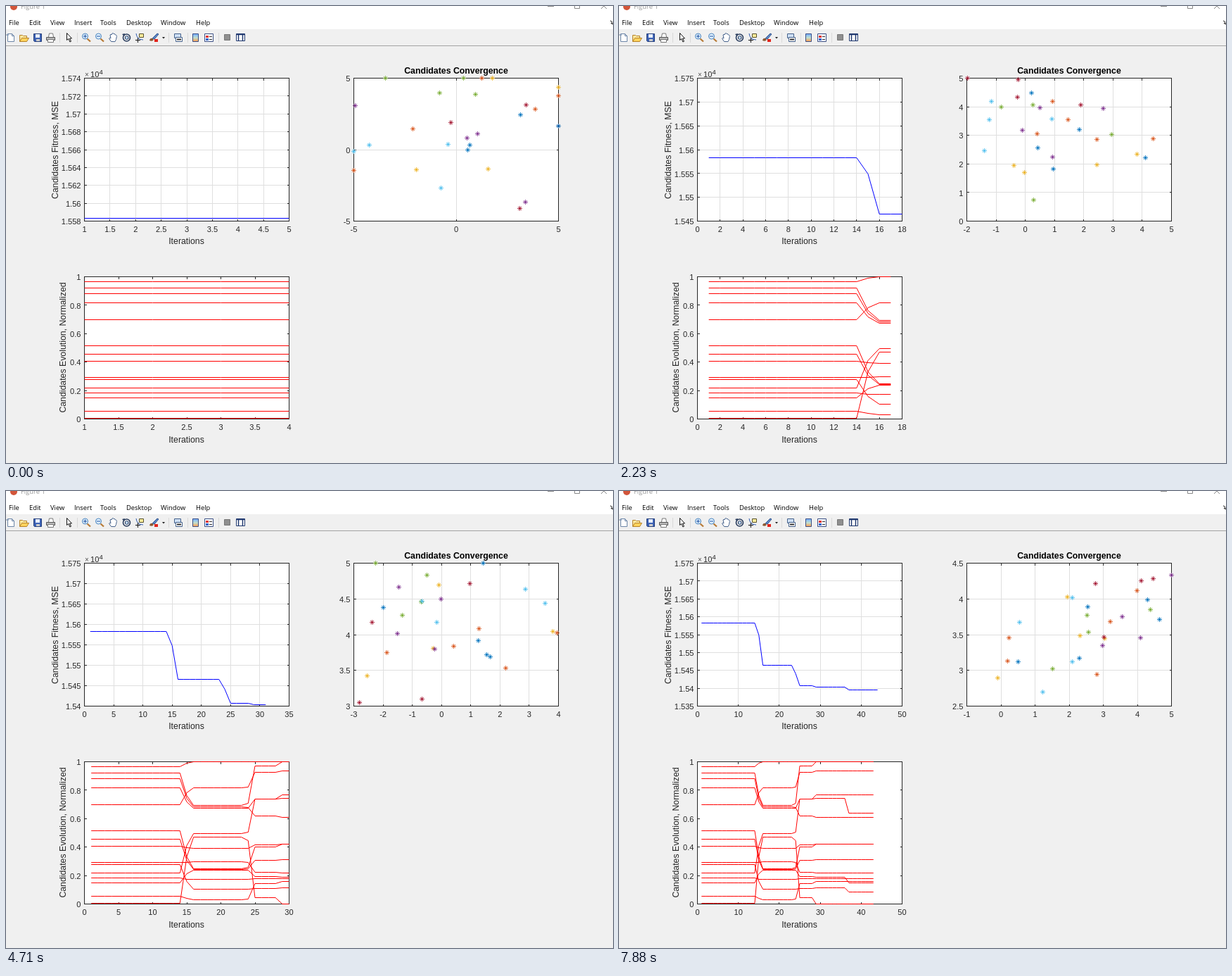
These frames come from a looping animation (863 px wide and 649 px high, 8000 ms). An HTML page:

```html
<!DOCTYPE html>
<html lang="en">
<head>
<meta charset="utf-8">
<title>Convergence plots</title>
<style>
  html, body { margin: 0; width: 100%; height: 100%; overflow: hidden; background: #f0f0f0; }
  svg { display: block; width: 863px; height: 649px; }
  text { font-family: "Liberation Sans", Arial, sans-serif; fill: #262626; }
  .menu text { font: 9.4px "Open Sans", "Noto Sans", sans-serif; fill: #000; }
  .tick { font-size: 11.1px; }
  .label { font-size: 12.3px; text-anchor: middle; }
  .title { font-size: 12.3px; font-weight: bold; text-anchor: middle; fill: #000; }
  .mid { text-anchor: middle; }
  .end { text-anchor: end; }
  .grid { stroke: #dfdfdf; }
  .axis { stroke: #262626; fill: none; }
  .grid, .axis { shape-rendering: crispEdges; }
  .line { fill: none; stroke-linejoin: round; }
  .star { fill: none; stroke-width: .85; }
</style>
</head>
<body>
<svg viewBox="0 0 863 649">
  <rect width="863" height="649" fill="#f0f0f0"/>
  <rect width="863" height="33" fill="#fff"/>
  <path d="M0 56.5H863" stroke="#a2a2a2"/>

  <g class="menu">
    <circle cx="11" cy="1" r="5" fill="#d2553a"/>
    <text x="21" y="4" style="fill:#999">Figure 1</text>
    <text x="4" y="27">File</text>
    <text x="33" y="27">Edit</text>
    <text x="63" y="27">View</text>
    <text x="97" y="27">Insert</text>
    <text x="134" y="27">Tools</text>
    <text x="171" y="27">Desktop</text>
    <text x="220" y="27">Window</text>
    <text x="270" y="27">Help</text>
  </g>
  <g fill="none" stroke="#888">
    <path d="M770 .5h9M808.5 0v3.5h7V0M846 4l4-4 4 4"/>
    <path d="M859 21q3 0 3 4m-2-1l2 2 2-2" stroke="#222"/>
  </g>

  <g fill="none">
    <path d="M76.5 38v14M101.5 38v14M231.5 38v14M258.5 38v14M302.5 38v14" stroke="#d9d9d9"/>
    <path d="M2.5 39.5h6l3 3v8h-9z" fill="#fff" stroke="#6d86a8"/>
    <path d="M8.5 39.5v3h3M0 41h4" stroke="#6d86a8"/>
    <path d="M19.5 50.5v-9h4l1 1h5v3" fill="#ffe9a0" stroke="#b5822a"/>
    <path d="M19.5 50.5l3-5h10l-3 5z" fill="#ffd35c" stroke="#b5822a"/>
    <path d="M39.5 39.5h11v11h-10l-1-1z" fill="#3d62b5" stroke="#27407c"/>
    <path d="M42 40h6v5h-6z" fill="#e8f0ff"/>
    <path d="M43 47h5v3h-5z" fill="#ccc"/>
    <path d="M60.5 44l1-5h5l1 5" fill="#fff" stroke="#777"/>
    <path d="M57.5 44.5h12v4h-12z" fill="#b9b9b9" stroke="#555"/>
    <path d="M59.5 47.5h8v4h-8z" fill="#fff" stroke="#777"/>
    <path d="M86.5 38.5v10l2.4-2 2 4.5 1.6-.8-2-4.2h3z" fill="#fff" stroke="#111"/>
    <g id="zoom">
      <path d="M115.5 46.5l4.5 4" stroke="#b77a35" stroke-width="2.2"/>
      <circle cx="112.5" cy="43" r="4" fill="#dff1ff" stroke="#4a83bd"/>
      <path d="M110 43h5" stroke="#1f4fa0"/>
    </g>
    <use href="#zoom" x="19"/>
    <path d="M112.5 40.5v5" stroke="#1f4fa0"/>
    <path d="M149.5 50.5l-3-4.5q1-1.500 2.5 0l-1-5q1-1.500 2 0l1-2q1.200-.8 1.800 0l1.200.8q1.200-.4 1.500 1l1.500.8q.8.5.3 2l-.8 4-1.500 3z" fill="#fff" stroke="#46628c"/>
    <circle cx="171.5" cy="45" r="5" stroke="#283b5c" stroke-width="1.6"/>
    <path d="M169.5 43.5l2-1 2.5 1v3l-2.5 1-2-1z" fill="#b9d3f0" stroke="#283b5c"/>
    <path d="M165 40l4-1-1 4z" fill="#283b5c"/>
    <path d="M185 39q1 9 10 9" stroke="#2d5bb0"/>
    <path d="M189.5 39.5h6v5h-6z" fill="#ffeb9a" stroke="#57532f"/>
    <path d="M184 48.5h7M187.5 45v7" stroke="#111"/>
    <path d="M208 46l7-7 2 1-6 7z" fill="#5b87c9" stroke="#35568c"/>
    <path d="M204 49q1-4 4-3l2 2q-2 3-6 1z" fill="#8a5a34"/>
    <path d="M211 47h5v4h-5z" fill="#e3241b"/>
    <path d="M222 44h4l-2 2.5z" fill="#222"/>
    <path d="M239.5 39.5h9v6h-9z" fill="#cfe0f5" stroke="#44608a"/>
    <path d="M241.5 44.5h9v6h-9z" fill="#fff" stroke="#44608a"/>
    <path d="M243 47.5h6" stroke="#333" stroke-width="2"/>
    <path d="M265.5 39.5h8v11h-8z" fill="url(#bar)" stroke="#3b4f85"/>
    <path d="M282.5 39.5h12v11h-12z" fill="#fff" stroke="#3b4f85"/>
    <path d="M284 42h4v3h-4z" fill="#d33"/>
    <path d="M284 46h4v3h-4z" fill="#36c"/>
    <path d="M289 43.5h4M289 47.5h4" stroke="#333"/>
    <path d="M310.5 40.5h8v8h-8z" fill="#8f8f8f" stroke="#777"/>
    <path d="M327.5 39.5h12v10h-12z" fill="#fff" stroke="#223a70"/>
    <path d="M327 40.5h13M330.5 40v9M336.5 40v9" stroke="#223a70" stroke-width="1.5"/>
  </g>
  <defs>
    <linearGradient id="bar" x2="0" y2="1">
      <stop stop-color="#6fa8ff"/><stop offset=".5" stop-color="#bfe0d0"/><stop offset="1" stop-color="#ff9a4a"/>
    </linearGradient>
  </defs>

  <g id="plots"></g>

  <text x="112" y="101" font-size="10" fill-opacity=".75">×</text>
  <text class="tick" x="120" y="101">10</text>
  <text x="132.5" y="97" font-size="9.5">4</text>
  <text class="title" x="640" y="96">Candidates Convergence</text>
  <text class="label" x="256.5" y="338">Iterations</text>
  <text class="label" x="256.5" y="619.5">Iterations</text>
  <text class="label" transform="translate(73.5 204.5) rotate(-90)">Candidates Fitness, MSE</text>
  <text class="label" transform="translate(85 485) rotate(-90)">Candidates Evolution, Normalized</text>
</svg>

<script>
const LOOP = 8000, COUNT = 30;
const fitBox = { l: 111.5, r: 402.5, t: 102.5, b: 305.5 };
const starBox = { l: 494.5, r: 785.5, t: 102.5, b: 305.5 };
const evoBox = { l: 111.5, r: 402.5, t: 384.5, b: 586.5 };
const colors = ['#0072bd', '#d95319', '#edb120', '#7e2f8e', '#77ac30', '#4dbeee', '#a2142f'];

// iteration n is reached at time t; x and y give the reach of the swarm
const keys = [
  { n: 5, t: 0, x: [-6, 7], y: [-4.1, 7] },
  { n: 9, t: 600, x: [-3.4, 5.6], y: [-.55, 6] },
  { n: 15, t: 1530, x: [-1.5, 4.4], y: [-.05, 5.3] },
  { n: 23, t: 3010, x: [-2.75, 4.3], y: [2.05, 5.4] },
  { n: 31, t: 4710, x: [-2.8, 3.95], y: [3.05, 5.2] },
  { n: 37, t: 6110, x: [-1.4, 3.1], y: [2.99, 4.6] },
  { n: 44, t: 7880, x: [-.1, 5], y: [2.7, 4.33] }
];

// levels of each trait: at the start, from 16, from 29 and, if it moves again, from 37
const traits = [
  [.966, 1, 1], [.92, .692, 1], [.881, .684, .61], [.818, .672, .745, .639],
  [.699, .818, .938], [.517, .25, .42], [.456, .245, .314], [.404, .391, .419],
  [.29, .296, .217], [.276, .105, .112, .083], [.22, .493, .765],
  [.181, .172, .178], [.15, .24, .188, .147], [.054, .03, .158], [.006, .47, 0]
];

const mix = (a, b, u) => a + (b - a) * u;

function trait([a, b, c, d = c], i) {
  if (i < 15) return a;
  if (i < 16) return mix(a, b, .7);
  if (i < 24) return b;
  if (i < 25) return mix(b, c, .05);
  if (i < 29) return mix(b, c, .9);
  return i < 37 ? c : d;
}

// each improvement lowers the best error
const drops = [[15, .00345], [16, .0084], [24, .0024], [25, .0034], [29, .0004], [37, .0007]];
const fitness = i => drops.reduce((v, [at, d]) => i >= at ? v - d : v, 1.55835);

// pair of keys around a value, and the way between them
function between(field, v) {
  const j = Math.min(keys.length - 2, keys.filter(k => k[field] <= v).length - 1);
  const a = keys[j], b = keys[j + 1];
  return { a, b, u: Math.min(1, (v - a[field]) / (b[field] - a[field])) };
}

function iterationAt(t) {
  const { a, b, u } = between('t', t);
  return Math.floor(mix(a.n, b.n, u) + 1e-6);
}

function random(seed) {
  const v = Math.sin(seed * 127.1) * 43758.5453;
  return v - Math.floor(v);
}

// bell-shaped scatter stretched over the current reach, held inside the search space
function spread(n, dim) {
  const { a, b, u } = between('n', n);
  const lo = mix(a[dim][0], b[dim][0], u), hi = mix(a[dim][1], b[dim][1], u);
  const seed = n * 201 + (dim === 'y' ? 100 : 0);
  const raw = Array.from({ length: COUNT }, (_, k) =>
    random(seed + k) + random(seed + k + .3) + random(seed + k + .6));
  const min = Math.min(...raw), max = Math.max(...raw);
  return raw.map(v => Math.max(-5, Math.min(5, mix(lo, hi, (v - min) / (max - min)))));
}

function countAxis(n) {
  const step = n < 7 ? .5 : n < 12 ? 1 : n === 15 ? 5 : n <= 20 ? 2 : n <= 40 ? 5 : 10;
  return { lo: n < 12 ? 1 : 0, hi: Math.ceil(n / step) * step, step };
}

function dataAxis(values) {
  const min = Math.min(...values), max = Math.max(...values), span = max - min;
  const step = span > 8.8 ? 5 : span > 7.5 ? 2 : span > 3.3 ? 1 : .5;
  return { lo: Math.floor(min / step) * step, hi: Math.ceil(max / step) * step, step };
}

function fitAxis(n) {
  if (n < 15) return { lo: 1.558, hi: 1.574, step: .002 };
  return { lo: Math.floor(fitness(n) / .005) * .005, hi: 1.575, step: .005 };
}

const scales = (box, ax, ay) => ({
  x: v => mix(box.l, box.r, (v - ax.lo) / (ax.hi - ax.lo)),
  y: v => mix(box.b, box.t, (v - ay.lo) / (ay.hi - ay.lo))
});

const snap = v => Math.floor(v + .01) + .5;

function ticks({ lo, hi, step }) {
  const count = Math.round((hi - lo) / step);
  return Array.from({ length: count + 1 }, (_, i) => +(lo + i * step).toFixed(4));
}

function frame(box, ax, ay, s, grid) {
  const { l, r, t, b } = box;
  let lines = '', marks = '', text = '';
  for (const v of ticks(ax)) {
    const x = snap(s.x(v));
    lines += `M${x} ${t}V${b}`;
    marks += `M${x} ${b}v-3M${x} ${t}v3`;
    text += `<text class="tick mid" x="${s.x(v)}" y="${b + 15.7}">${v}</text>`;
  }
  for (const v of ticks(ay)) {
    const y = snap(s.y(v));
    lines += `M${l} ${y}H${r}`;
    marks += `M${l} ${y}h3M${r} ${y}h-3`;
    text += `<text class="tick end" x="${l - 5}" y="${s.y(v) + 4.7}">${v}</text>`;
  }
  return `<rect x="${l}" y="${t}" width="${r - l}" height="${b - t}" fill="#fff"/>` +
    (grid ? `<path class="grid" d="${lines}"/>` : '') +
    `<path class="axis" d="M${l} ${t}H${r}V${b}H${l}Z${marks}"/>` + text;
}

function curve(level, n, s, color) {
  let pts = '';
  for (let i = 1; i <= n; i++) pts += `${s.x(i).toFixed(2)},${snap(s.y(level(i)))} `;
  return `<polyline class="line" stroke="${color}" points="${pts}"/>`;
}

function star(x, y, color) {
  return `<path class="star" stroke="${color}" d="M${x - 3.5} ${y}h7M${x} ${y - 3.5}v7` +
    `M${x - 2.5} ${y - 2.5}l5 5M${x - 2.5} ${y + 2.5}l5-5"/>`;
}

function draw(n) {
  const fx = countAxis(n), fy = fitAxis(n), fs = scales(fitBox, fx, fy);
  const ex = countAxis(n - 1), ey = { lo: 0, hi: 1, step: .2 }, es = scales(evoBox, ex, ey);
  const xs = spread(n, 'x'), ys = spread(n, 'y');
  const sx = dataAxis(xs), sy = dataAxis(ys), ss = scales(starBox, sx, sy);
  return frame(fitBox, fx, fy, fs, true) + curve(fitness, n, fs, '#00f') +
    frame(starBox, sx, sy, ss, true) +
    xs.map((x, k) => star(snap(ss.x(x)), snap(ss.y(ys[k])), colors[k % 7])).join('') +
    frame(evoBox, ex, ey, es, false) +
    traits.map(levels => curve(i => trait(levels, i), n - 1, es, '#f00')).join('');
}

const plots = document.getElementById('plots');
const origin = performance.now();
let shown = 0;
function tick(now) {
  const n = iterationAt(Math.max(0, now - origin) % LOOP);
  if (n !== shown) {
    plots.innerHTML = draw(n);
    shown = n;
  }
  requestAnimationFrame(tick);
}
tick(origin);
</script>
</body>
</html>
```
